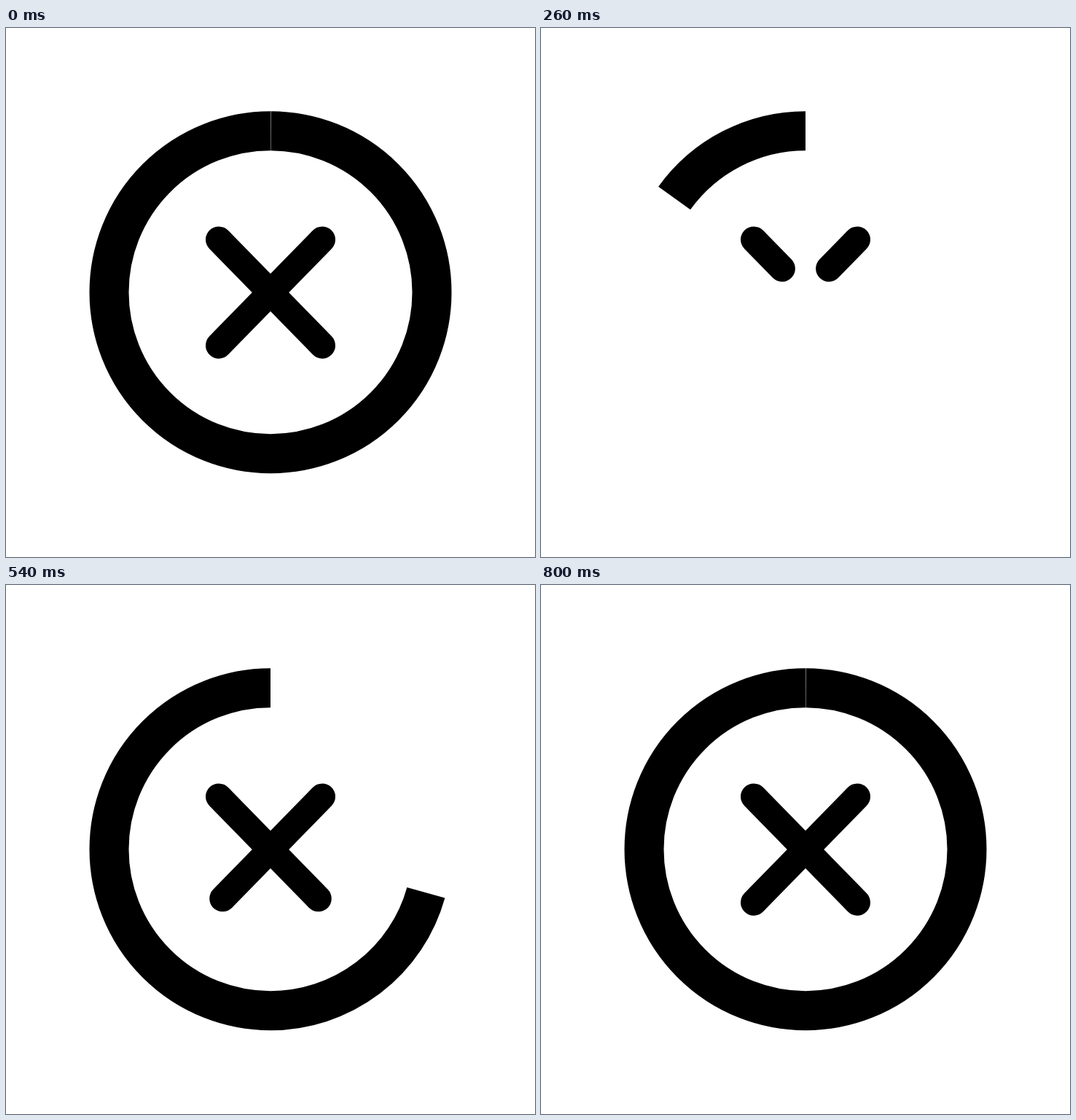
Animation, 726 px wide and 726 px high, one loop 1360 ms. Source, as an HTML page with a canvas:

```html
<!DOCTYPE html>
<html>
<head>
<meta charset="utf-8">
<style>
  html, body { margin: 0; width: 100%; height: 100%; overflow: hidden; background: #fff; }
  canvas { display: block; width: 726px; height: 726px; }
</style>
</head>
<body>
<canvas id="stage" width="726" height="726"></canvas>
<script>
const ctx = document.getElementById('stage').getContext('2d');
const LOOP = 1360, STEP = 20, START = 100;
const CX = 363, CY = 362.7, RADIUS = 221.5, TOP = -Math.PI / 2;

// Slightly uneven pacing: [ms since start, share of the drawing time]
const PACE = [[0, 0], [160, 0.254], [260, 0.3715], [360, 0.5306], [500, 0.7145], [700, 1]];

function pace(ms) {
  if (ms < 0 || ms >= 700) return 1;
  const i = PACE.findIndex(([t]) => t > ms);
  const [t0, p0] = PACE[i - 1], [t1, p1] = PACE[i];
  return p0 + (p1 - p0) * (ms - t0) / (t1 - t0);
}

const ease = x => (1 - Math.cos(Math.PI * Math.min(x, 1))) / 2;

function drawRing(share) {
  const sweep = Math.max(share * 2 * Math.PI, 0.4 / RADIUS);
  ctx.lineWidth = 54;
  ctx.lineCap = 'butt';
  ctx.beginPath();
  ctx.arc(CX, CY, RADIUS, TOP, TOP - sweep, true);
  ctx.stroke();
}

function drawBar(side, share) {
  const x = CX + side * 71, y = 290.4, s = Math.max(share, 0.0005);
  ctx.lineWidth = 36;
  ctx.lineCap = 'round';
  ctx.beginPath();
  ctx.moveTo(x, y);
  ctx.lineTo(x - side * 142 * s, y + 145.3 * s);
  ctx.stroke();
}

function draw(now) {
  const time = Math.floor(now % LOOP / STEP) * STEP;
  const phase = pace(time - START);
  const cross = ease(phase * 1.38);
  ctx.fillStyle = '#fff';
  ctx.fillRect(0, 0, 726, 726);
  ctx.strokeStyle = '#000';
  drawRing(ease(phase));
  drawBar(-1, cross);
  drawBar(1, cross);
}

let origin;
function tick(now) {
  origin ??= now;
  draw(now - origin);
  requestAnimationFrame(tick);
}
draw(0);
requestAnimationFrame(tick);
</script>
</body>
</html>
```
